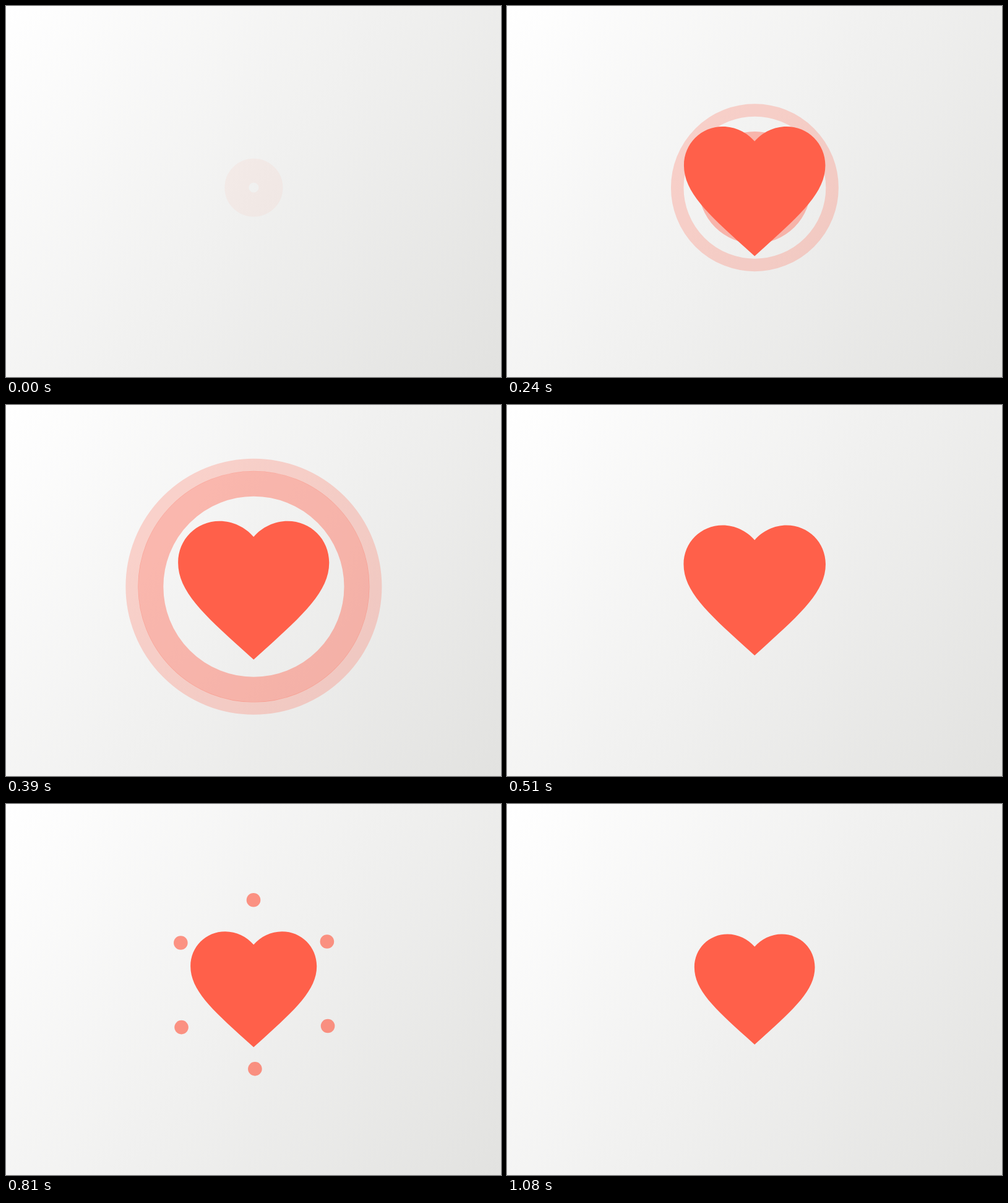
These frames come from a looping animation (800 by 600 pixels, 1800 ms). An HTML page with a canvas:

```html
<!DOCTYPE html>
<html>
<head>
<meta charset="utf-8">
<style>
  html, body { margin: 0; width: 100%; height: 100%; overflow: hidden; }
  canvas { display: block; }
</style>
</head>
<body>
<canvas id="stage" width="800" height="600"></canvas>
<script>
const LOOP = 1800, STEP = 30, RED = '#ff604a';
const ctx = document.getElementById('stage').getContext('2d');
const heart = new Path2D('M12 21.35l-1.45-1.32C5.4 15.36 2 12.28 2 8.5 2 5.42 4.42 3 7.5 3c1.74 0 3.41.81 4.5 2.09C13.09 3.81 14.76 3 16.5 3 19.58 3 22 5.42 22 8.5c0 3.78-3.4 6.86-8.55 11.54z');

const sky = ctx.createLinearGradient(0, 0, 800, 600);
sky.addColorStop(0, '#fff');
sky.addColorStop(1, '#e2e2e0');

const clamp = x => Math.min(1, Math.max(0, x));
const span = (t, from, to) => clamp((t - from) / (to - from));
const sineInOut = u => (1 - Math.cos(Math.PI * u)) / 2;
const quadOut = u => 1 - (1 - u) ** 2;

function ring(outer, width, alpha) {
  ctx.globalAlpha = alpha;
  ctx.lineWidth = width;
  ctx.beginPath();
  ctx.arc(400.4, 293.7, outer - width / 2, 0, 2 * Math.PI);
  ctx.stroke();
}

function drawRings(t) {
  const thin = 47 + 164 * sineInOut(span(t, 30, 430));
  const thick = 41.5 + 172 * sineInOut(span(t, 100, 490));
  ring(thin, 39 - 18.5 * span(t, 30, 126),
    (0.06 + 0.19 * span(t, 30, 137)) * (1 - span(t, 390, 450)));
  ring(thick, 28 + 13 * span(t, 120, 240),
    0.42 * span(t, 60, 175) * (1 - span(t, 390, 490)));
}

function drawDots(t) {
  const grow = quadOut(span(t, 480, 990));
  ctx.globalAlpha = 1 - span(t, 720, 990);
  for (let i = 0; i < 6; i++) {
    const a = (i * 60 - 90.5) * Math.PI / 180;
    ctx.beginPath();
    ctx.arc(401.2 + 156 * grow * Math.cos(a), 291.8 + 156 * grow * Math.sin(a),
      12.9 * grow, 0, 2 * Math.PI);
    ctx.fill();
  }
}

function drawHeart(t) {
  const size = t < 328
    ? 1.3 * quadOut(span(t, 77, 313))
    : 1 + 0.3 * ((1140 - t) / 812) ** 2;
  ctx.save();
  ctx.globalAlpha = span(t, 75, 170);
  ctx.translate(400.2, 299.75);
  ctx.scale(9.72 * size, 9.72 * size);
  ctx.translate(-12, -12.175);
  ctx.fill(heart);
  ctx.restore();
}

function draw() {
  const now = performance.now() % LOOP;
  const t = Math.min(1080, now - now % STEP);
  ctx.globalAlpha = 1;
  ctx.fillStyle = sky;
  ctx.fillRect(0, 0, 800, 600);
  ctx.fillStyle = ctx.strokeStyle = RED;
  drawRings(t);
  drawDots(t);
  drawHeart(t);
  requestAnimationFrame(draw);
}
draw();
</script>
</body>
</html>
```
